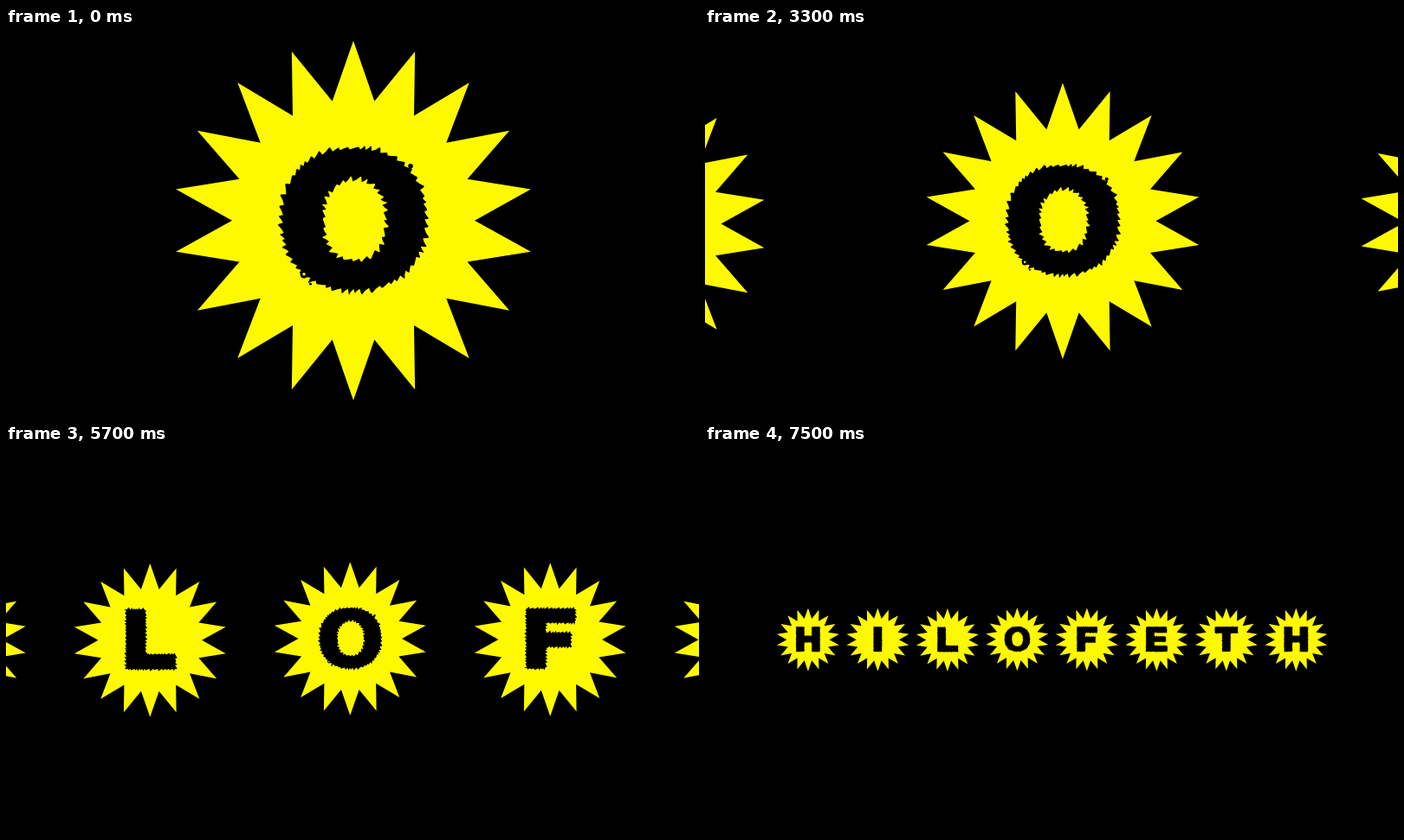
These frames come from a looping animation (800x450 px, 9.9 s). An HTML page with a canvas:

```html
<!DOCTYPE html>
<html lang="en">
<head>
<meta charset="utf-8">
<title>Star letters</title>
<style>
  html, body { margin: 0; width: 100%; height: 100%; overflow: hidden; background: #000; }
  canvas { display: block; width: 800px; height: 450px; }
</style>
</head>
<body>
<canvas id="stage" width="800" height="450"></canvas>
<script>
const ctx = document.getElementById('stage').getContext('2d');
const LOOP = 9900, STEP = 100, ZOOM_START = 1667, ZOOM_TIME = 5800;
const YELLOW = '#fff900', BLACK = '#000';
const WORD = 'HILOFETH', FOCUS = 3;
const RADIUS = 208;

// Letter outlines as x, y pairs around the centre of a full-size star.
const OUTLINES = {
  H: [-78,-84, -25,-84, -25,-25, 25,-25, 25,-84, 78,-84, 78,79, 25,79, 25,18, -25,18, -25,79, -78,79],
  I: [-27,-84, 27,-84, 27,79, -27,79],
  L: [-65,-84, -12,-84, -12,38, 69,38, 69,79, -65,79],
  F: [-65,-84, 68,-84, 68,-45, -12,-45, -12,-19, 56,-19, 56,20, -12,20, -12,79, -65,79],
  E: [-69,-84, 67,-84, 67,-46, -16,-46, -16,-21, 60,-21, 60,14, -16,14, -16,40, 70,40, 70,79, -69,79],
  T: [-75,-84, 75,-84, 75,-42, 27,-42, 27,79, -27,79, -27,-42, -75,-42]
};
const DROP = { O: 0, H: 0.012, I: 0.012, L: 0.02, F: 0.01, E: 0.012, T: 0.01 };
// Loose ink around the O: x, y, radius, colour.
const BLOTS = [
  [66, -63, 2.8, BLACK], [-57, 62.5, 4.3, BLACK],
  [-57, 62, 1.7, YELLOW], [-49.5, 73.5, 1.4, BLACK]
];

function seeded(seed) {
  return () => {
    seed = (seed * 16807) % 2147483647;
    return seed / 2147483647;
  };
}

function superellipse(cx, cy, rx, ry, power) {
  const bend = v => Math.sign(v) * Math.abs(v) ** (2 / power);
  return Array.from({ length: 96 }, (_, i) => {
    const a = i / 96 * Math.PI * 2;
    return [cx + rx * bend(Math.cos(a)), cy + ry * bend(Math.sin(a))];
  });
}

function pairs(flat) {
  const points = [];
  for (let i = 0; i < flat.length; i += 2) points.push([flat[i], flat[i + 1]]);
  return points;
}

// Adds a torn edge of slanted teeth to a closed clockwise outline.
function tear(path, points, random) {
  let started = false;
  points = points.concat([points[0]]);
  const lengths = points.slice(1).map((p, i) => Math.hypot(p[0] - points[i][0], p[1] - points[i][1]));
  const total = lengths.reduce((a, b) => a + b, 0);

  function at(d, out) {
    let i = 0;
    d = Math.min(d, total - 0.001);
    while (i < lengths.length - 1 && d > lengths[i]) d -= lengths[i++];
    const [x, y] = points[i], len = lengths[i] || 1;
    const ux = (points[i + 1][0] - x) / len, uy = (points[i + 1][1] - y) / len;
    return [x + ux * d + uy * out, y + uy * d - ux * out];
  }

  for (let d = 0; d < total;) {
    const width = 6 + random() * 7;
    const height = 1.5 + random() * 4;
    const base = at(d, -1.2);
    if (started) path.lineTo(...base);
    else path.moveTo(...base);
    started = true;
    path.quadraticCurveTo(...at(d + width * 0.45, 0.6), ...at(d + width * 0.78, height));
    path.lineTo(...at(d + width * 0.88, height * 0.8));
    d += width;
  }
  path.closePath();
}

function makeLetter(char) {
  const path = new Path2D();
  const random = seeded(char.charCodeAt(0) * 977);
  if (char === 'O') {
    tear(path, superellipse(0.5, -1.5, 83, 82, 2.25), random);
    tear(path, superellipse(1.5, -0.5, 35, 46, 2.25), random);
  } else {
    tear(path, pairs(OUTLINES[char]), random);
  }
  return path;
}

function makeStar() {
  const path = new Path2D();
  for (let i = 0; i < 36; i++) {
    const a = i * Math.PI / 18, r = i % 2 ? 140 : RADIUS;
    path.lineTo(r * Math.sin(a), -r * Math.cos(a));
  }
  path.closePath();
  return path;
}

const star = makeStar();
const letters = {};
for (const char of WORD) letters[char] = letters[char] || makeLetter(char);

function drawBadge(char, x, y, scale) {
  ctx.save();
  ctx.translate(x, y);
  ctx.scale(scale, scale);
  ctx.fillStyle = YELLOW;
  ctx.fill(star);
  ctx.fillStyle = BLACK;
  ctx.fill(letters[char], 'evenodd');
  if (char === 'O') {
    for (const [bx, by, r, color] of BLOTS) {
      ctx.fillStyle = color;
      ctx.beginPath();
      ctx.arc(bx, by, r, 0, Math.PI * 2);
      ctx.fill();
    }
  }
  ctx.restore();
}

function draw(time) {
  const t = Math.floor((time % LOOP) / STEP) * STEP;
  const p = Math.min(1, Math.max(0, (t - ZOOM_START) / ZOOM_TIME));
  const r = RADIUS - 171.5 * p;
  const gap = r * (3.51 - 1.305 * p);
  const cx = 401 + 75 * p - 115.6 * p * p;
  const cy = 222.7 + 2 * p;

  ctx.fillStyle = BLACK;
  ctx.fillRect(0, 0, 800, 450);
  [...WORD].forEach((char, i) => {
    const x = cx + (i - FOCUS) * gap;
    if (x > -r && x < 800 + r) drawBadge(char, x, cy + DROP[char] * r, r / RADIUS);
  });
}

function tick() {
  draw(performance.now());
  requestAnimationFrame(tick);
}
tick();
</script>
</body>
</html>
```
